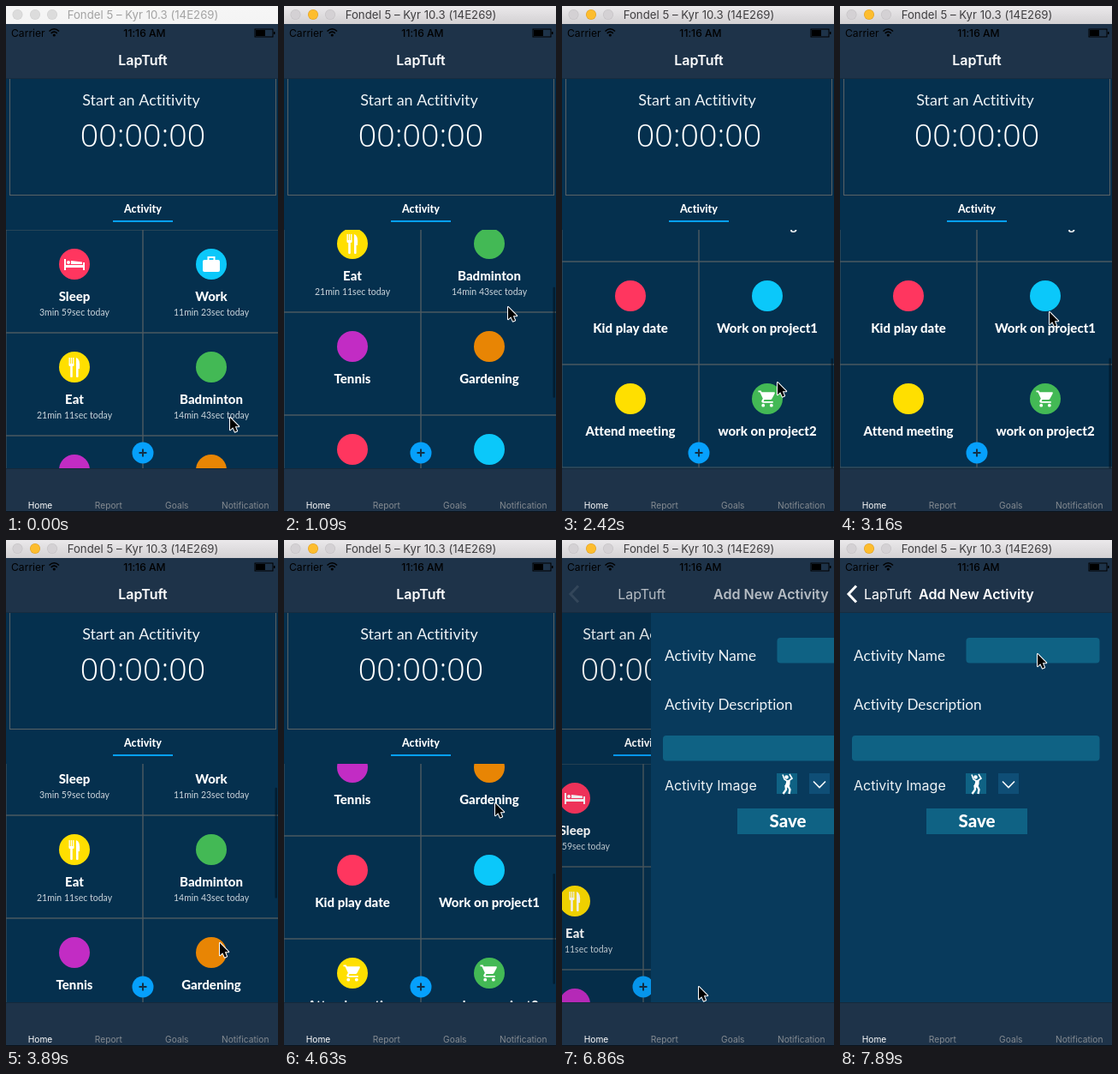
An HTML page with a canvas for the animation above (8000 ms loop, 318x590 px).

```html
<!DOCTYPE html>
<html lang="en">
<head>
<meta charset="utf-8">
<title>Activity timer</title>
<style>
  html, body { margin: 0; width: 100%; height: 100%; overflow: hidden; background: #05304e; }
  canvas { display: block; width: 318px; height: 590px; }
</style>
</head>
<body>
<canvas id="stage"></canvas>
<script>
const W = 318, H = 590, LOOP = 8000;
const LIST_TOP = 261, LIST_BOTTOM = 539, ROW = 120, MAX_SCROLL = 322;
const AVENIR = 'Lato, sans-serif', SYSTEM = 'Inter, sans-serif', DIGITS = '"Open Sans", sans-serif';
const NAV = '#1e3349', PAGE = '#05304e', FORM = '#083a5c', FIELD = '#0f6284', LINE = '#4b5860', BLUE = '#06a0fc';
const APP_NAME = 'LapTuft';

const canvas = document.getElementById('stage');
const ctx = canvas.getContext('2d');
const ratio = window.devicePixelRatio || 1;
canvas.width = W * ratio;
canvas.height = H * ratio;

const activities = [
  ['Sleep', '3min 59sec today', '#ff365f', 'bed'],
  ['Work', '11min 23sec today', '#0bc8fa', 'case'],
  ['Eat', '21min 11sec today', '#ffdf00', 'cutlery'],
  ['Badminton', '14min 43sec today', '#43b955'],
  ['Tennis', '', '#c22cc4'],
  ['Gardening', '', '#e88504'],
  ['Kid play date', '', '#ff365f'],
  ['Work on project1', '', '#0bc8fa'],
  ['Attend meeting', '', '#ffdf00', 'lateCart'],
  ['work on project2', '', '#43b955', 'cart']
];
const CART_TIME = 3800;

// Keys are [time, value, ...]
const scrollKeys = [[600, 0], [2267, 323], [3160, 323], [3900, 60], [4638, 276],
  [4920, 323], [5230, 300], [5820, -21], [6260, 0]];
const cursorKeys = [[600, 262, 480], [1240, 262, 330], [1682, 264, 384], [2500, 252, 440],
  [3160, 245, 357], [3900, 250, 470], [4638, 247, 307], [5100, 249, 320], [5820, 257, 472],
  [6260, 164, 512], [6410, 158, 519], [6555, 160, 521], [7000, 160, 521], [7880, 231, 133]];

const mix = (a, b, u) => a + (b - a) * u;

function track(keys, time, ease) {
  const next = keys.findIndex(key => key[0] > time);
  if (next === 0) return keys[0].slice(1);
  if (next < 0) return keys[keys.length - 1].slice(1);
  const from = keys[next - 1], to = keys[next];
  const u = ease((time - from[0]) / (to[0] - from[0]));
  return from.slice(1).map((value, i) => mix(value, to[i + 1], u));
}
const easeOut = u => Math.sin(u * Math.PI / 2);
const easeInOut = u => u * u * (3 - 2 * u);

function rect(x, y, w, h, color, radius = 0) {
  ctx.fillStyle = color;
  ctx.beginPath();
  ctx.roundRect(x, y, w, h, radius);
  ctx.fill();
}
function circle(x, y, r, color) {
  ctx.fillStyle = color;
  ctx.beginPath();
  ctx.arc(x, y, r, 0, 7);
  ctx.fill();
}
function stroke(path, color, width) {
  ctx.strokeStyle = color;
  ctx.lineWidth = width;
  ctx.stroke(new Path2D(path));
}
function text(string, x, y, size, { family = AVENIR, weight = 400, color = '#fff', align = 'center' } = {}) {
  ctx.font = `${weight} ${size}px ${family}`;
  ctx.letterSpacing = '0.01px'; // any spacing turns ligatures off
  ctx.textAlign = align;
  ctx.fillStyle = color;
  ctx.fillText(string, x, y);
}
function group(x, y, draw) {
  ctx.save();
  ctx.translate(x, y);
  draw();
  ctx.restore();
}
function clip(x, y, w, h) {
  ctx.beginPath();
  ctx.rect(x, y, w, h);
  ctx.clip();
}

const cartPath = new Path2D('M1 2v2h2l3.6 7.6-1.4 2.4c-.7 1.4.3 3 1.8 3h12v-2H7.4l.9-2h7.5q1.2 0 1.8-1l3.5-6.5q.5-1.5-.9-1.5H5.2l-.9-2z');
const arrowPath = new Path2D('M0 0V14.2L3.3 11.2 5.7 16.6 8.1 15.5 5.8 10.3H10.2Z');

// Icons are centred on the origin
const icons = {
  bed() {
    rect(-12, -6, 2, 13, '#fff');
    rect(-12, 1, 24, 3, '#fff');
    rect(10, -2, 2, 9, '#fff');
    circle(-7, -2, 2, '#fff');
    ctx.fillStyle = '#fff';
    ctx.fill(new Path2D('M-4 0V-4L9-2.5V0Z'));
  },
  case() {
    rect(-10, -5, 20, 14, '#fff', 2);
    stroke('M-3.5-5V-8H3.5V-5', '#fff', 2);
  },
  cutlery() {
    for (const x of [-6.5, -4.2, -1.9]) rect(x, -11, 1.3, 8, '#fff');
    rect(-6.5, -4, 6, 3, '#fff', 1);
    rect(-4.8, -2, 2.6, 14, '#fff', 1);
    ctx.fillStyle = '#fff';
    ctx.fill(new Path2D('M2-11Q7-10 6 2H2Z'));
    rect(2, 1, 2.6, 11, '#fff', 1);
  },
  cart() {
    ctx.translate(-11.5, -11.5);
    ctx.scale(.96, .96);
    ctx.fillStyle = '#fff';
    ctx.fill(cartPath);
    circle(7, 20, 2, '#fff');
    circle(17, 20, 2, '#fff');
  }
};

function drawCell([name, duration, color, icon], index, time) {
  const x = index % 2 * 160, y = Math.floor(index / 2) * ROW;
  group(x, y, () => {
    ctx.strokeStyle = LINE;
    ctx.lineWidth = 1;
    ctx.strokeRect(0, 0, 160, ROW);
    circle(80, 40, 18, color);
    if (icon === 'lateCart') icon = time >= CART_TIME ? 'cart' : '';
    if (icon) group(80, 40, icons[icon]);
    text(name, 80, 82.5, 15, { weight: 800 });
    text(duration, 80, 99.5, 10.5, { color: '#cbd5dc' });
  });
}

function drawHome(time) {
  rect(0, 85, W, 455, PAGE);
  ctx.strokeStyle = '#5b6265';
  ctx.lineWidth = 1;
  ctx.strokeRect(4.5, 84.5, 311, 136);
  text('Start an Actitivity', 158, 116, 18, { color: '#eef3f6' });
  text('00:00:00', 160, 164, 37.5, { family: DIGITS, weight: 300 });
  text('Activity', 160, 241, 12.5, { weight: 800 });
  rect(125, 250, 70, 2, BLUE);

  const [scroll] = track(scrollKeys, time, easeOut);
  ctx.save();
  clip(0, LIST_TOP, W, LIST_BOTTOM - LIST_TOP);
  group(0, LIST_TOP - Math.round(scroll), () => activities.forEach((item, i) => drawCell(item, i, time)));
  if (time > 600 && time < 6250) {
    const view = LIST_BOTTOM - LIST_TOP;
    const length = view * view / 600 + Math.min(0, scroll);
    const top = LIST_TOP + Math.max(0, scroll) / MAX_SCROLL * (view - length);
    rect(314.5, top, 2.5, length, 'rgba(0,10,20,.5)', 1.2);
  }
  ctx.restore();

  circle(160, 521, 12.5, BLUE);
  stroke('M155.5 521H164.5M160 516.5V525.5', '#123049', 2);
}

function drawForm() {
  rect(0, 85, W, 455, FORM);
  const label = { align: 'left', color: '#eef3f6' };
  text('Activity Name', 16, 141, 17.2, label);
  text('Activity Description', 16, 198, 17.2, label);
  text('Activity Image', 16, 291.5, 16, { ...label, family: SYSTEM });
  rect(147.5, 114, 156, 29.5, FIELD, 4);
  rect(14, 228, 289.5, 29.5, FIELD, 4);
  rect(147, 272, 24, 24, FIELD);
  circle(158.5, 276.5, 2.3, '#fff');
  stroke('M154 273.5L156 279 160 281.5 165 278 162 273', '#fff', 1.6);
  stroke('M160.5 280Q161 284 158.5 288', '#fff', 4.6);
  stroke('M157.5 286L158 291 154.5 296M160 286L162.5 291 161.5 296', '#fff', 2.4);
  rect(185, 272, 24, 24, '#0f4e76');
  stroke('M190 281.5L197 288.5 204 281.5', '#fff', 1.6);
  rect(101, 313, 118, 30, FIELD);
  text('Save', 160, 335, 20.5, { weight: 800 });
}

function drawWindowBar(active) {
  const shade = ctx.createLinearGradient(0, 0, 0, 21);
  shade.addColorStop(0, active ? '#ebe9eb' : '#f6f6f6');
  shade.addColorStop(1, active ? '#d3d1d3' : '#f4f4f4');
  rect(0, 0, W, 21, shade);
  [13.5, 34, 54].forEach((x, i) => {
    const lit = active && i === 1;
    circle(x, 10, 6, lit ? '#dfa023' : active ? '#c4c1c4' : '#d0d0d0');
    circle(x, 10, 5.4, lit ? '#fdbd2e' : active ? '#d4d1d4' : '#dcdcdc');
  });
  text('Fondel 5 – Kyr 10.3 (14E269)', 160, 14.5, 13.2, { family: SYSTEM, color: active ? '#3f3e40' : '#a3a3a3' });
}

function drawNavigation(push) {
  rect(0, 21, W, 64, NAV);
  rect(0, 84, W, 1, '#182c3f');
  const black = { family: SYSTEM, color: '#000' };
  text('Carrier', 6, 35.5, 12.1, { ...black, align: 'left' });
  text('11:16 AM', 162, 35.5, 12.1, { ...black, weight: 500 });
  stroke('M50.5 29.5Q56.3 24 62 29.5M52.7 31.8Q56.3 28.5 59.8 31.8', '#000', 1.6);
  circle(56.3, 34, 1.6, '#000');
  ctx.lineWidth = 1;
  ctx.strokeRect(291, 27, 21, 9);
  rect(292, 28, 11, 7, '#000');
  rect(313, 30, 1.5, 3, '#000');

  const title = { family: SYSTEM, weight: 600 };
  if (!push) {
    text(APP_NAME, 160, 69, 16, title);
    return;
  }
  ctx.globalAlpha = push ** 6;
  stroke('M19 53.5L10 63 19 72.5', '#fff', 3);
  ctx.globalAlpha = push;
  text(APP_NAME, mix(142, 28, push), 69, 16, { family: SYSTEM, align: 'left' });
  text('Add New Activity', mix(352, 92, push), 69, 16.1, { ...title, align: 'left' });
  ctx.globalAlpha = 1;
}

function drawTabs() {
  rect(0, 539, W, 51, NAV);
  rect(0, 539, W, 1, '#16293b');
  rect(0, 589, W, 1, '#0b131b');
  ['Home', 'Report', 'Goals', 'Notification'].forEach((name, i) =>
    text(name, 40 + i * 79.9, 585.5, 10.2, { family: SYSTEM, color: i ? '#858b91' : '#fff' }));
}

function drawCursor(time) {
  const [x, y] = track(cursorKeys, time, easeInOut);
  group(Math.round(x), Math.round(y), () => {
    ctx.lineJoin = 'round';
    ctx.strokeStyle = '#fff';
    ctx.lineWidth = 2;
    ctx.stroke(arrowPath);
    ctx.fillStyle = '#000';
    ctx.fill(arrowPath);
  });
}

// Critically damped spring for the page transition
function pushAmount(time) {
  const x = Math.max(0, time - 6708.3) * .01576;
  const amount = 1 - (1 + x) * Math.exp(-x);
  return amount > .998 ? 1 : amount;
}

function draw(time) {
  ctx.setTransform(ratio, 0, 0, ratio, 0, 0);
  const push = pushAmount(time);
  drawNavigation(push);
  ctx.save();
  clip(0, 85, W, 455);
  if (push < 1) {
    group(Math.round(-96 * push), 0, () => drawHome(time));
    rect(0, 85, W, 455, `rgba(0,0,0,${.1 * push})`);
  }
  if (push) group(Math.round(W * (1 - push)), 0, drawForm);
  ctx.restore();
  drawTabs();
  drawWindowBar(time >= 500);
  drawCursor(time);
}

// The screen refreshes in even steps after an initial pause
const PAUSE = 500, STEP = 147.8, LEAD = 12;
function stepped(time) {
  if (time < PAUSE) return 0;
  return PAUSE + Math.floor((time - PAUSE + LEAD) / STEP) * STEP;
}

function tick() {
  draw(stepped(performance.now() % LOOP));
  requestAnimationFrame(tick);
}
tick();
</script>
</body>
</html>
```
